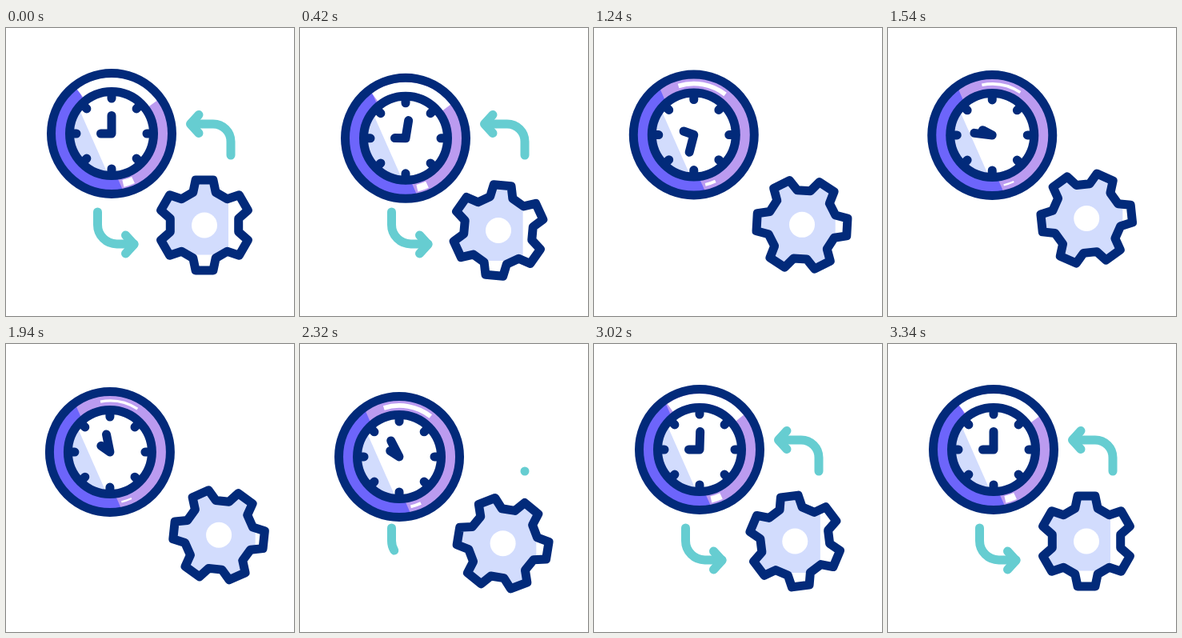
These frames come from a looping animation (360x360 px, 3.6 s). An HTML page with a canvas:

```html
<!DOCTYPE html>
<html lang="en">
<head>
<meta charset="utf-8">
<title>Clock and gear</title>
<style>
html, body { margin: 0; width: 100%; height: 100%; overflow: hidden; background: #fff; }
canvas { display: block; width: 360px; height: 360px; }
</style>
</head>
<body>
<canvas id="stage" width="360" height="360"></canvas>
<script>
const ctx = document.getElementById('stage').getContext('2d');
const NAVY = '#022a7a', TEAL = '#66cdd1', PALE = '#d2dcfd';
const VIOLET = '#6d65fb', MAUVE = '#bb9bf0', WHITE = '#fff';
const LOOP = 3600, STEP = 20, START = 220, END = 3340;
const LINE = 11, RAD = Math.PI / 180;

// Progress 0..1 through a time span, linear or eased.
const ramp = (t, start, len) => Math.min(1, Math.max(0, (t - start) / len));
const ease = (t, start, len) => (1 - Math.cos(Math.PI * ramp(t, start, len))) / 2;

// Out-and-back moves: a hop leaves briskly, a swell softly.
const hop = (t, start, len, size) => size * Math.sin(Math.PI * ramp(t, start, len));
const swell = (t, start, len, size) => size * Math.sin(Math.PI * ramp(t, start, len)) ** 2;

function clockAt(t) {
  const x = 132 - swell(t, 500, 1230, 8) - swell(t, 1730, 1230, 8);
  const y = 132 + hop(t, START, 1070, 10.5) + hop(t, 1290, 550, 2) + hop(t, 1840, 910, 9);
  return [x, y];
}

function gearAt(t) {
  const x = 248 + swell(t, 560, 1020, 16) + swell(t, 1580, 900, 20) + swell(t, 2480, 700, 7.5);
  const y = 246.5 + hop(t, START, 1000, 11) - hop(t, 1220, 1000, 10) +
            hop(t, 2220, 360, 3.5) - hop(t, 2580, 360, 4.5);
  return [x, y];
}

const handTurn = t => 360 * (ease(t, START, 1940) - ease(t, 2160, 900));
const gearTurn = t => 360 * ease(t, 180, 3120);

// Highlights are widest at rest and thinnest halfway.
const calm = t => Math.cos(Math.PI * ramp(t, START, END - START)) ** 2;

const upper = {
  delay: 160, length: 78.6, tip: [230.5, 120], dir: 1,
  path() {
    ctx.moveTo(281, 159);
    ctx.lineTo(281, 142);
    ctx.arc(259, 142, 22, 0, -Math.PI / 2, true);
    ctx.lineTo(232, 120);
  }
};
const lower = {
  delay: 0, length: 75.2, tip: [160, 270.5], dir: -1,
  path() {
    ctx.moveTo(114.5, 230);
    ctx.lineTo(114.5, 246);
    ctx.arc(138.5, 246, 24, Math.PI, Math.PI / 2, true);
    ctx.lineTo(160, 270);
  }
};

function pen(color, width) {
  ctx.strokeStyle = color;
  ctx.lineWidth = width;
  ctx.lineCap = ctx.lineJoin = 'round';
}

function disc(r, color) {
  ctx.beginPath();
  ctx.arc(0, 0, r, 0, 7);
  ctx.fillStyle = color;
  ctx.fill();
}

function ring(r) {
  pen(NAVY, LINE);
  ctx.beginPath();
  ctx.arc(0, 0, r, 0, 7);
  ctx.stroke();
}

// Angles run clockwise from twelve o'clock.
function polar(r, deg) {
  return [r * Math.sin(deg * RAD), -r * Math.cos(deg * RAD)];
}

function band(from, to, r, width) {
  pen(WHITE, width);
  ctx.lineCap = 'butt';
  ctx.beginPath();
  ctx.arc(0, 0, r, (from - 90) * RAD, (to - 90) * RAD);
  ctx.stroke();
}

// Fills the part of a disc to the left of a slanted line.
function leftShade(r, xTop, xBottom, color) {
  ctx.save();
  ctx.beginPath();
  ctx.arc(0, 0, r, 0, 7);
  ctx.clip();
  ctx.beginPath();
  ctx.moveTo(-90, -r);
  ctx.lineTo(xTop, -r);
  ctx.lineTo(xBottom, r);
  ctx.lineTo(-90, r);
  ctx.fillStyle = color;
  ctx.fill();
  ctx.restore();
}

function drawClock(t) {
  const s = calm(t), turn = handTurn(t);
  ctx.save();
  ctx.translate(...clockAt(t));
  disc(75, MAUVE);
  leftShade(75, -50, 16, VIOLET);
  band(-10 - 28 * s, 32 + 22 * s, 64, 3 + 10 * s);
  band(155, 167, 64, 2 + 7 * s);
  disc(52, WHITE);
  leftShade(52, -50, -4, PALE);
  ring(75.5);
  ring(52.5);

  ctx.beginPath();
  for (let a = 0; a < 360; a += 45) {
    ctx.moveTo(...polar(52, a));
    ctx.lineTo(...polar(44, a));
  }
  ctx.stroke();

  ctx.beginPath();
  ctx.moveTo(...polar(13.5, 270 + turn / 10));
  ctx.lineTo(0, 0);
  ctx.lineTo(...polar(22.5, turn));
  ctx.stroke();
  ctx.restore();
}

function gearPath(turn) {
  const body = 43.5, tip = 57.5;
  ctx.beginPath();
  for (let a = turn; a < turn + 359; a += 60) {
    ctx.lineTo(...polar(body, a - 19));
    ctx.lineTo(...polar(tip, a - 11));
    ctx.lineTo(...polar(tip, a + 11));
    ctx.lineTo(...polar(body, a + 19));
  }
  ctx.closePath();
}

function drawGear(t) {
  const s = calm(t), turn = gearTurn(t);
  ctx.save();
  ctx.translate(...gearAt(t));
  gearPath(turn);
  ctx.fillStyle = PALE;
  ctx.fill();

  ctx.save();
  ctx.clip();
  ctx.fillStyle = WHITE;
  ctx.fillRect(46 - 16 * s, -70, 70, 140);
  ctx.fillRect(-70, 62 - 25 * s, 140, 70);
  ctx.restore();

  disc(16, WHITE);
  pen(NAVY, LINE);
  gearPath(turn);
  ctx.stroke();
  ctx.restore();
}

// The line slips away behind its head, then is drawn again from its tail.
function drawArrow(arrow, now) {
  const t = now - arrow.delay, back = t >= 2160;
  const from = back ? 0 : ramp(t, 440, 400);
  const to = back ? ramp(t, 2160, 420) : 1;
  const head = back ? ramp(t, 2580, 140) : 1 - ramp(t, 800, 140);
  pen(TEAL, LINE);
  if (from < 1) {
    const len = arrow.length;
    ctx.setLineDash([Math.max(0.01, (to - from) * len), 999]);
    ctx.lineDashOffset = -from * len;
    ctx.beginPath();
    arrow.path();
    ctx.stroke();
    ctx.setLineDash([]);
  }
  if (head > 0) {
    const [x, y] = arrow.tip, dx = 10.5 * arrow.dir * head, dy = 11.5 * head;
    ctx.beginPath();
    ctx.moveTo(x + dx, y - dy);
    ctx.lineTo(x, y);
    ctx.lineTo(x + dx, y + dy);
    ctx.stroke();
  }
}

function draw(t) {
  ctx.fillStyle = WHITE;
  ctx.fillRect(0, 0, 360, 360);
  drawArrow(upper, t);
  drawArrow(lower, t);
  drawClock(t);
  drawGear(t);
}

const begin = performance.now();
function tick() {
  const t = Math.max(0, performance.now() - begin) % LOOP;
  draw(Math.floor(t / STEP) * STEP);
  requestAnimationFrame(tick);
}
tick();
</script>
</body>
</html>
```
